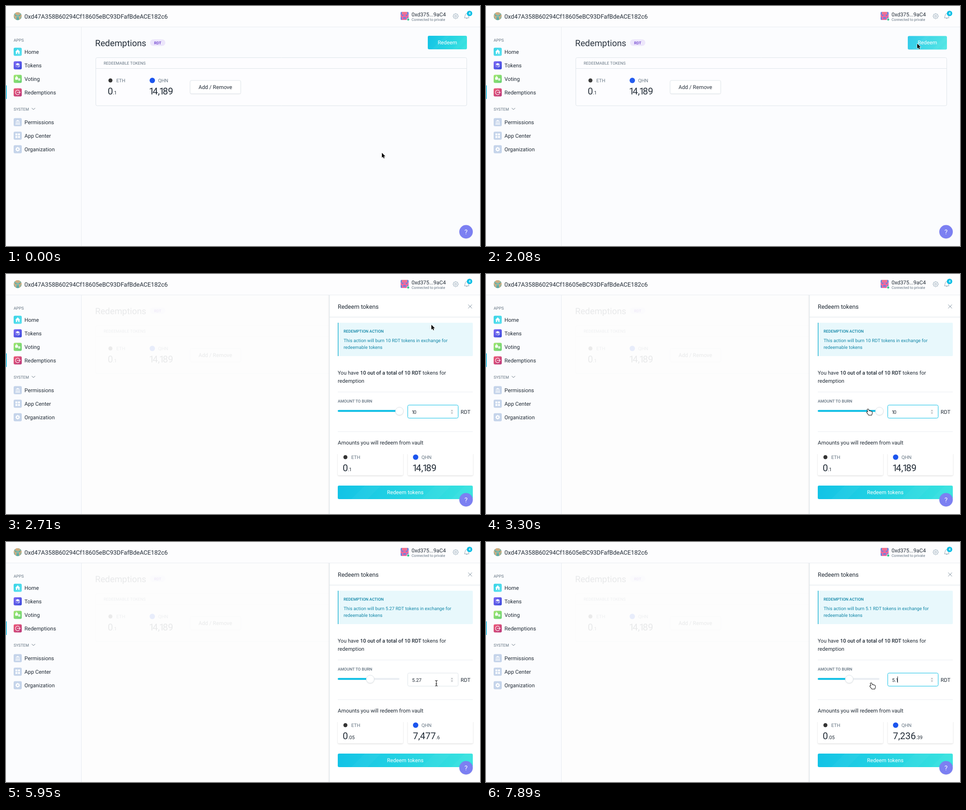
An HTML page with a canvas for the animation above (8000 ms loop, 1053 by 532 pixels).

```html
<!DOCTYPE html>
<html lang="en">
<head>
<meta charset="utf-8">
<title>Redemptions</title>
<style>
html, body { margin: 0; width: 100%; height: 100%; overflow: hidden; background: #fbfcfe; }
canvas { display: block; width: 1053px; height: 532px; }
</style>
</head>
<body>
<canvas id="stage"></canvas>
<script>
const W = 1053, H = 532, LOOP = 8000;
const INK = '#212b36', MUTED = '#637381', LINE = '#dde4e9', CYAN = '#08bee5', TEAL = '#1287a8';
const FONT = 'Roboto, "Noto Sans", sans-serif';

const canvas = document.getElementById('stage');
const ctx = canvas.getContext('2d');
const dpr = window.devicePixelRatio || 1;
canvas.width = W * dpr;
canvas.height = H * dpr;
ctx.textRendering = 'geometricPrecision';

// Timelines: each row holds from its time until the next row.
const VALUES = [[0, '10'], [4330, '8.9'], [4480, '6.93'], [5070, '6.41'], [5220, '5.62'],
  [5370, '5.27'], [7140, '5.2'], [7590, '5'], [7740, '5.'], [7890, '5.1']];
const SLIDE = [[0, 340], [2260, 130], [2410, 19], [2560, 3], [2710, 0]];
const VEIL = [[0, 0], [2080, .04], [2260, .58], [2410, .86], [2560, .905]];
const POINTER = [[0, 835, 325, 'arrow']];
for (let k = 1; k <= 8; k++) {
  const p = k / 8, e = p * p * (3 - 2 * p);
  POINTER.push([740 + (k - 1) * 148.5, 835 + 123 * e, 325 - 242 * e, 'arrow']);
}
POINTER.push(
  [2710, 945, 112, 'arrow'], [2850, 879, 229, 'arrow'], [3000, 865, 273, 'arrow'],
  [3300, 852, 306, 'hand'], [3450, 826, 306, 'hand'], [3600, 846, 306, 'hand'],
  [3740, 907, 306, 'hand'], [3890, 873, 305, 'hand'], [4330, 850, 306, 'hand'],
  [4480, 822, 307, 'hand'], [5070, 813, 307, 'hand'], [5220, 807, 307, 'hand'],
  [5510, 812, 308, 'hand'], [5660, 846, 310, 'hand'], [5810, 916, 312, 'beam'],
  [5950, 956, 313, 'beam'], [6100, 925, 312, 'beam'], [6240, 859, 319, 'hand']);

const at = (rows, t) => rows.reduce((hit, row) => row[0] <= t ? row : hit);

function setFont(size, weight) {
  ctx.font = `${weight} ${size}px ${FONT}`;
}

// Draws text centred on y and returns its right end.
function text(s, x, y, size, color = INK, weight = 400, align = 'left') {
  setFont(size, weight);
  ctx.textAlign = align;
  ctx.fillStyle = color;
  ctx.fillText(s, x, y + .36 * size);
  return x + ctx.measureText(s).width;
}

// Proportional figures: the 1 takes less room.
function digits(s, x, base, size) {
  setFont(size, 400);
  ctx.textAlign = 'left';
  ctx.fillStyle = INK;
  for (const c of s) {
    const thin = c === '1';
    ctx.fillText(c, x - (thin ? .06 * size : 0), base);
    x += ctx.measureText(c).width - (thin ? .24 * size : 0);
  }
  return x;
}

function amount(n, x, y) {
  const [whole, part] = String(+n.toFixed(2)).split('.');
  const end = digits((+whole).toLocaleString('en-US'), x, y + 7.5, 20.8);
  if (part) digits('.' + part, end, y + 7.5, 10.8);
}

function rect(x, y, w, h, color) {
  ctx.fillStyle = color;
  ctx.fillRect(x, y, w, h);
}

function box(x, y, w, h, r, fill, stroke) {
  ctx.beginPath();
  ctx.roundRect(x, y, w, h, r);
  if (fill) { ctx.fillStyle = fill; ctx.fill(); }
  if (stroke) { ctx.strokeStyle = stroke; ctx.lineWidth = 1; ctx.stroke(); }
}

function disc(x, y, r, fill, stroke) {
  box(x - r, y - r, 2 * r, 2 * r, r, fill, stroke);
}

function path(d, x, y, fill, stroke, width = 1) {
  const p = new Path2D(d);
  ctx.save();
  ctx.translate(x, y);
  ctx.lineCap = ctx.lineJoin = 'round';
  if (stroke) { ctx.strokeStyle = stroke; ctx.lineWidth = width; ctx.stroke(p); }
  if (fill) { ctx.fillStyle = fill; ctx.fill(p); }
  ctx.restore();
}

function shadowed(blur, dy, color, draw) {
  ctx.save();
  ctx.shadowBlur = blur * dpr;
  ctx.shadowOffsetY = dy * dpr;
  ctx.shadowColor = color;
  draw();
  ctx.restore();
}

function gradient(x, y, w, h, from, to) {
  const g = ctx.createLinearGradient(x, y, x + w, y + h);
  g.addColorStop(0, from);
  g.addColorStop(1, to);
  return g;
}

function gear(x, y, r) {
  ctx.beginPath();
  for (let i = 0; i < 32; i++) {
    const a = (i - .5) * Math.PI / 16, d = i % 4 < 2 ? r : r * .78;
    ctx.lineTo(x + d * Math.cos(a), y + d * Math.sin(a));
  }
  ctx.closePath();
}

function mosaic(x, y, cell, rows, colors) {
  rows.forEach((row, j) => [...row].forEach((c, i) =>
    rect(x + i * cell, y + j * cell, cell + .2, cell + .2, colors[c])));
}

function ctaButton(x, y, w, h, label) {
  ctx.save();
  box(x, y, w, h, 3, gradient(x, y, w, h, '#12c3e6', '#38e3df'));
  ctx.clip();
  ctx.fillStyle = 'rgba(255,255,255,.035)';
  for (const p of [.1, .62, .84]) {
    ctx.beginPath();
    ctx.moveTo(x + w * p, y + h);
    ctx.lineTo(x + w * p + h, y);
    ctx.lineTo(x + w * p + h + w * .12, y);
    ctx.lineTo(x + w * p + w * .12, y + h);
    ctx.fill();
  }
  ctx.restore();
  text(label, x + w / 2, y + h / 2 - .3, 11.8, '#fff', 400, 'center');
}

function token(x, y, name, color, r, n) {
  disc(x, y, r, color);
  text(name, x + 13, y, 10.6, MUTED);
  amount(n, x - 6, y + 23);
}

function header() {
  rect(0, 0, W, 46, '#fdfdfe');
  rect(0, 46, W, 1, '#e8ecf1');
  ctx.save();
  disc(26, 22.5, 9);
  ctx.clip();
  mosaic(17, 13.5, 3, ['tooaot', 'taooat', 'otggto', 'aoggoa', 'tottot', 'oattao'],
    { t: '#5ba79f', o: '#d8a576', a: '#a9b48e', g: '#7fb5a4' });
  ctx.restore();
  text('0xd47A358B60294Cf18605eBC93DFafBdeACE182c6', 41, 23, 13.45);

  ctx.save();
  box(876.5, 13, 18, 18, 2.5);
  ctx.clip();
  mosaic(876.5, 13, 3, ['bccccb', 'bcppcb', 'pbppbp', 'pppppp', 'bpbbpb', 'bppppb'],
    { b: '#5b7ee2', p: '#e8629c', c: '#f0708a' });
  ctx.restore();
  disc(893.5, 30, 2.8, '#2cc68f', '#fff');
  text('0xd375...9aC4', 901, 18.5, 11.9);
  text('Connected to private', 901, 30.5, 8.1, MUTED);

  const icon = '#8fa4b5';
  gear(999, 22.5, 6);
  ctx.strokeStyle = icon;
  ctx.lineWidth = 1;
  ctx.stroke();
  disc(999, 22.5, 2.1, null, icon);
  path('M-5 4C-3.4 2.4-4-5.4 0-5.4S3.4 2.4 5 4ZM-1.4 5.4Q0 7.4 1.4 5.4', 1023.5, 22, null, icon);
  disc(1029.8, 16.5, 6, CYAN);
  text('4', 1029.9, 16.6, 8, '#fff', 500, 'center');
}

const GLYPHS = {
  Home: () => path('M-5.4 .3L0-5.4 5.4 .3H4V4.8H1.2V1.2H-1.2V4.8H-4V.3Z', 0, 0, '#fff'),
  Tokens() {
    path('M0-5L5-2.4 0 .2-5-2.4Z', 0, 0, '#fff');
    path('M-5-1.6L-.4 .9V5.4L-5 3Z', 0, 0, 'rgba(255,255,255,.25)');
    path('M5-1.6L.4 .9V5.4L5 3Z', 0, 0, 'rgba(255,255,255,.5)');
  },
  Voting() {
    box(-5.5, -4, 6, 6, 1.2, '#fff');
    path('M-1.5-4L-3-6', 0, 0, null, '#fff', 1.4);
    box(1, -1.5, 4.8, 5.5, 1.2, 'rgba(255,255,255,.75)');
  },
  Redemptions: () => path('M3.6-3.6A5.1 5.1 0 1 0 3.6 3.6M-1.4 0H5.6M3.4-2.2L5.6 0 3.4 2.2', 0, 0, null, '#fff', 1.1),
  Permissions: () => path('M-5-2L0-5 5-2ZM-4-1H-2.6V3H-4ZM-.7-1H.7V3H-.7ZM2.6-1H4V3H2.6ZM-5 3.6H5V5H-5Z', 0, 0, '#fff'),
  'App Center': () => path('M-5-5H-.7V-.7H-5ZM.7-5H5V-.7H.7ZM-5 .7H-.7V5H-5ZM.7 .7H5V5H.7Z', 0, 0, '#fff'),
  Organization() {
    gear(0, 0, 5.2);
    ctx.fillStyle = '#fff';
    ctx.fill();
    disc(0, 0, 1.8, '#c5d4ea');
  }
};

function navItem(name, y, from, to = from) {
  ctx.save();
  ctx.translate(26, y);
  box(-9, -9, 18, 18, 3, gradient(-9, -9, 18, 18, from, to));
  GLYPHS[name]();
  ctx.restore();
  text(name, 41, y, 11.9);
}

function sidebar() {
  rect(0, 47, 167, H - 47, '#fbfcfe');
  rect(167, 47, 1, H - 47, '#e8ecf1');
  rect(0, 176, 1.5, 30, CYAN);
  text('APPS', 17, 76, 9, MUTED);
  navItem('Home', 101.5, '#35d3e6', '#62e2f0');
  navItem('Tokens', 131.5, '#7d68f4', '#3748da');
  navItem('Voting', 161.5, '#a0e66e', '#68d074');
  navItem('Redemptions', 191.5, '#ef5a78', '#b83a7c');
  text('SYSTEM', 17, 228.5, 8.9, MUTED);
  path('M-3.5-1.7L0 1.8 3.5-1.7', 61, 228, null, MUTED);
  ['Permissions', 'App Center', 'Organization'].forEach((name, i) =>
    navItem(name, 257.5 + 30 * i, '#c5d4ea'));
}

function page(t) {
  rect(168, 47, W - 168, H - 47, '#fbfcfe');
  text('Redemptions', 198, 82, 19.3);
  box(320, 74, 34, 14.5, 7.2, '#ece6fb');
  text('RDT', 337, 81.5, 8.7, '#6635cc', 500, 'center');

  const pressed = t >= 1930 ? .5 : 0;
  ctaButton(937, 66 + pressed, 87, 30, 'Redeem');
  if (t >= 1780) box(937, 66 + pressed, 87, 30, 3, 'rgba(255,255,255,.1)');

  box(199.5, 114.5, 824, 106.5, 3, '#fdfdff', LINE);
  rect(200, 138, 823, 1, LINE);
  text('REDEEMABLE TOKENS', 217, 126.5, 9.1, MUTED);
  token(232, 165, 'ETH', '#343434', 4.5, .1);
  token(325, 165, 'QHN', '#1c55ee', 6, 14189);
  shadowed(2, 1, 'rgba(0,0,0,.08)', () => box(409, 165, 112.5, 29.5, 3, '#fff'));
  box(409, 165, 112.5, 29.5, 3, null, LINE);
  text('Add / Remove', 465, 179.5, 11.9, INK, 400, 'center');

  rect(168, 47, W - 168, H - 47, `rgba(253,253,253,${at(VEIL, t)[1]})`);
}

function slider(value) {
  const x = 737 + 13.7 * value;
  box(737, 301.5, 137, 4, 2, '#e9edf2');
  box(737, 301.5, x - 737, 4, 2, CYAN);
  shadowed(3, 1, 'rgba(0,0,0,.12)', () => disc(x, 304, 8.8, '#fff'));
  disc(x, 304, 8.8, null, LINE);
}

function amountField(t, entry) {
  const focused = t >= 2710 && t < 4330 || t >= 6100;
  const hovered = t >= 5810 && t < 6100;
  box(892.5, 290.5, 112, 29, 3, '#fff', focused ? CYAN : LINE);
  const end = digits(entry, 902, 309.5, 10.9);
  if (focused || hovered) {
    box(987.5, 299.5, 6, 12, 2.5, '#f3f4f5');
    path('M-1.5-2L0-3.8 1.5-2ZM-1.5 2L0 3.8 1.5 2Z', 990.7, 305.5, '#6b6f74');
  }
  if (t >= 6100 && t < 6540 || t >= 7140) rect(Math.round(end), 298, 1, 14, INK);
}

function panel(t) {
  const shift = at(SLIDE, t)[1], entry = at(VALUES, t)[1], value = parseFloat(entry);
  if (shift > 335) return;
  ctx.save();
  ctx.beginPath();
  ctx.rect(168, 47, W - 168, H - 47);
  ctx.clip();
  ctx.translate(shift, 0);
  shadowed(4, 0, 'rgba(0,0,0,.12)', () => rect(718, 40, 345, H, '#fff'));
  rect(718, 47, 1, H - 47, LINE);
  text('Redeem tokens', 737, 72, 13.2);
  path('M-4-4L4 4M4-4L-4 4', 1031, 72, null, '#7f91a0');
  rect(719, 95, 340, 1, LINE);

  box(737, 108, 300, 74, 2, '#e8f8fc');
  rect(737, 108, 1.5, 74, '#25b5d3');
  text('REDEMPTION ACTION', 750, 126.5, 8.9, TEAL, 500);
  text(`This action will burn ${value} RDT tokens in exchange for`, 750, 147, 10.2, TEAL);
  text('redeemable tokens', 750, 162.5, 10.2, TEAL);

  let x = text('You have ', 737, 218.5, 11.6);
  x = text('10 out of a total of 10 RDT', x, 218.5, 11.6, INK, 500);
  text(' tokens for', x, 218.5, 11.6);
  text('redemption', 737, 236.5, 11.6);
  rect(737, 261, 300, 1, '#e9edf2');

  text('AMOUNT TO BURN', 737, 282, 9, MUTED, 500);
  slider(value);
  amountField(t, entry);
  text('RDT', 1010, 305.5, 11.8);
  rect(737, 349, 300, 1, '#e9edf2');

  text('Amounts you will redeem from vault', 737, 374, 11.9);
  for (const left of [737, 892.5])
    shadowed(3, 1, 'rgba(0,0,0,.16)', () => box(left, 396, 145, 50.5, 3, '#fff'));
  rect(735, 391, 305, 8, '#fff');
  token(754, 406, 'ETH', '#343434', 4.5, value / 100);
  token(910, 406, 'QHN', '#1c55ee', 6, 1418.9 * value);
  ctaButton(737, 469, 300, 30, 'Redeem tokens');
  ctx.restore();
}

function helpBubble() {
  shadowed(2, .5, 'rgba(0,0,0,.08)', () => disc(1022, 500.5, 15, '#7c80f2'));
  text('?', 1022, 500.5, 14.5, '#fff', 400, 'center');
}

const CURSORS = {
  arrow: (x, y) => path('M0 .4V11.2L2.5 8.9 4.2 12.7 5.9 12 4.3 8.3H7.7Z', x, y, '#000', '#fff', 1.3),
  hand: (x, y) => path('M-4.8-5.2C-4.4-6.7-2.5-6.5-2.1-5.2L-1.1-1.8C-.6-2.7 1-2.6 1.3-1.6 1.8-2.4 3.2-2.2 3.4-1 4.4-1.6 5.6-.9 5.6 .4V3C5.6 4.5 4.6 5 4.4 6.6H-1.8C-2.2 5-4.6 3-5.8 .8-6.2-.5-4.6-1-3.3 .6Z',
    x, y, '#fff', '#000', 2),
  beam: (x, y) => path('M-2.5-6Q0-6 0-4.5 0-6 2.5-6M0-4.5V4.5M-2.5 6Q0 6 0 4.5 0 6 2.5 6M-1.3 1.5H1.3', x, y, null, '#111', 1.1)
};

function frame() {
  const t = performance.now() % LOOP;
  ctx.setTransform(dpr, 0, 0, dpr, 0, 0);
  page(t);
  panel(t);
  sidebar();
  header();
  helpBubble();
  const [, x, y, kind] = at(POINTER, t);
  CURSORS[kind](x, y);
  requestAnimationFrame(frame);
}
frame();
</script>
</body>
</html>
```
